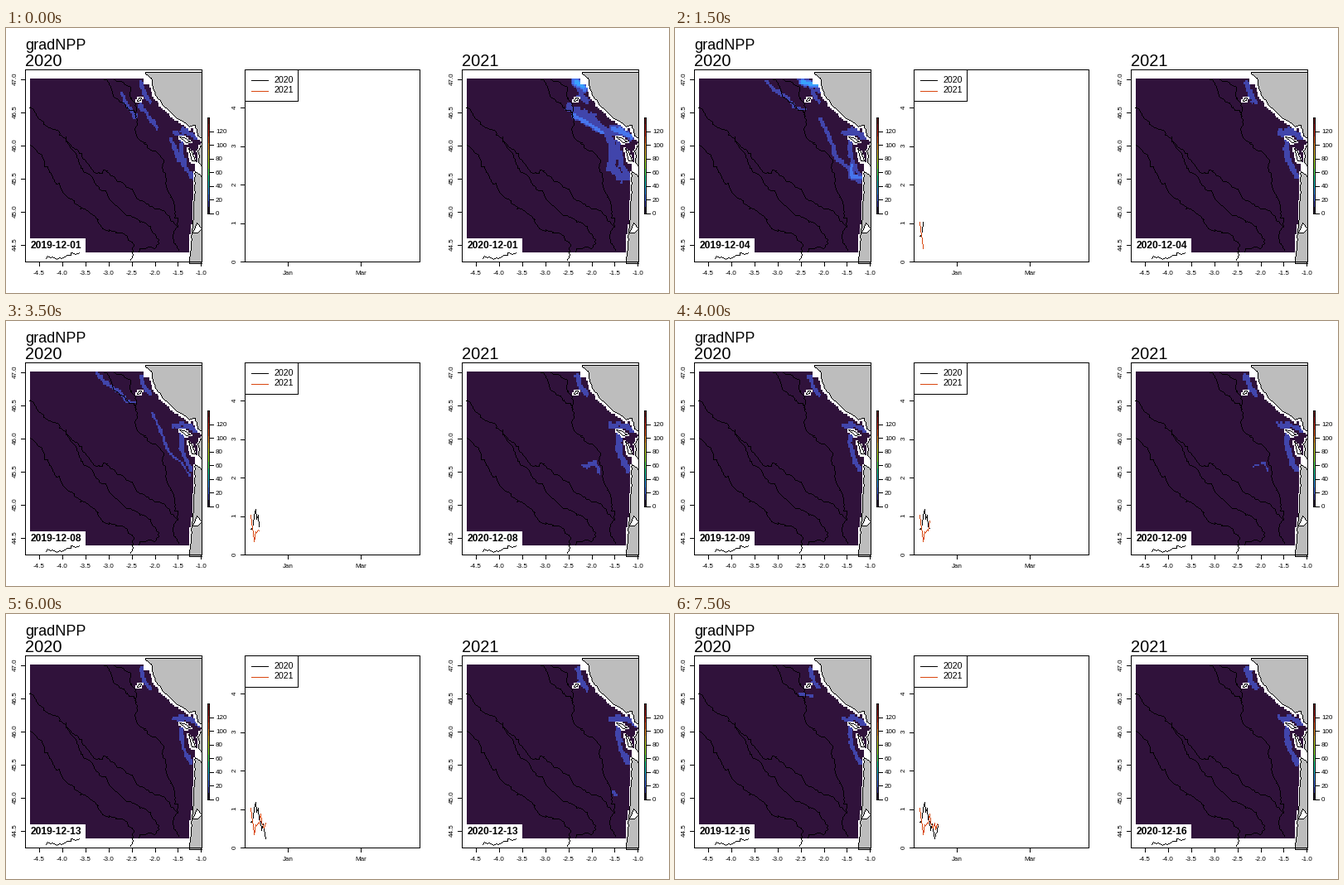
Animation of 800 by 320 pixels, one loop 8 s. Source, as a matplotlib script:

```python
import numpy as np
import matplotlib.pyplot as plt
from matplotlib.animation import FuncAnimation
from matplotlib.path import Path

W, H, DPI = 800, 320, 100
DAYS, STEP = 16, 500
PX = 72 / DPI
SHIFT = 527  # distance between the two maps
BLACK, WHITE, GREY = (0, 0, 0, 1), (1, 1, 1, 1), (0.745, 0.745, 0.745, 1)
ORANGE = (0.85, 0.28, 0.06, 1)

plt.rcParams["font.family"] = "Liberation Sans"
fig = plt.figure(figsize=(W / DPI, H / DPI), dpi=DPI, facecolor="white")
ax = fig.add_axes([0, 0, 1, 1])
ax.set_axis_off()


def line(xs, ys, color=BLACK, z=6):
    ax.plot(xs, ys, color=color, lw=PX, aa=False, zorder=z,
            solid_capstyle="butt")


def text(x, y, s, size, **kw):
    kw = {"ha": "left", "va": "baseline", "zorder": 9, **kw}
    return ax.text(x, y - 1.5, s, fontsize=size * PX, **kw)


def box(x0, y0, x1, y1):
    ax.fill([x0, x1, x1, x0], [y0, y0, y1, y1], fc="none", ec=BLACK,
            lw=PX, aa=False, zorder=6, joinstyle="miter")


def picture(rgba, extent, z):
    return ax.imshow(rgba, extent=extent, interpolation="nearest",
                     aspect="auto", zorder=z)


def x_tick(x, label):
    line([x, x], [281, 286])
    text(x, 299, label, 8, ha="center")


def y_tick(x, y, label):
    line([x - 5, x], [y, y])
    text(x - 12, y + 1, label, 8, rotation=90, ha="center", va="center")


# Curves drawn as single pixels, without smoothing
def canvas():
    return np.zeros((H, W, 4))


def dense(pts, step=1.0):
    """Resample a polyline evenly, counting the longer axis of each leg."""
    p = np.array(pts, float)
    s = np.r_[0, np.cumsum(np.abs(np.diff(p, axis=0)).max(1))]
    t = np.linspace(0, s[-1], max(2, int(np.ceil(s[-1] / step)) + 1))
    return np.c_[np.interp(t, s, p[:, 0]), np.interp(t, s, p[:, 1])]


def rough(pts, seed, amp):
    """A winding version of a polyline, with its ends kept."""
    rng = np.random.default_rng(seed)
    p = dense(pts, 2.5)
    n = rng.normal(0, amp, p.shape)
    for i in range(1, len(n)):
        n[i] += 0.7 * n[i - 1]
    n[[0, -1]] = 0
    return p + n


def trace(ink, pts, color=BLACK):
    x, y = np.rint(dense(np.rint(pts))).astype(int).T
    ok = (x >= 0) & (x < W) & (y >= 0) & (y < H)
    ink[y[ok], x[ok]] = color


def inside(pts, x, y):
    pix = np.c_[x.ravel(), y.ravel()]
    return Path(pts).contains_points(pix).reshape(x.shape)


# Land, from a few points of the coast
north = rough([(168, 53), (168, 56), (175, 60), (177, 69), (180, 80),
               (189, 93), (205, 108), (221, 119), (228, 117), (232, 131),
               (236, 133)], 1, 0.5)
middle = rough([(236, 141), (231, 148), (233, 155), (231, 162), (236, 168)], 2, 0.4)
south = rough([(236, 180), (228, 173), (227, 200), (225, 240), (221, 280)], 3, 0.25)
islands = [[(209, 131), (215, 132), (222, 137), (217, 138), (209, 131)],
           [(220, 145), (224, 149), (228, 160), (224, 160), (220, 145)],
           [(158, 88), (160, 84), (163, 84), (162, 87), (158, 88)]]
lagoon = [(225, 247), (230, 235), (236, 242), (231, 247), (225, 247)]
land = [np.vstack([north, (240, 133), (240, 53), north[:1]]),
        np.vstack([middle, (240, 168), (240, 141), middle[:1]]),
        np.vstack([south, (221, 284), (240, 284), (240, 180), south[:1]])]

# Depth contours, from deep to shallow
contours = [
    [(29, 141), (44, 154), (57, 186), (83, 212), (111, 231), (117, 244),
     (143, 250), (155, 263), (150, 280)],
    [(72, 131), (92, 168), (107, 184), (124, 206), (142, 224), (176, 238),
     (184, 262), (160, 270)],
    [(29, 95), (46, 119), (71, 131), (93, 155), (107, 173), (124, 173),
     (150, 193), (160, 207), (192, 222), (207, 240), (199, 252), (208, 268)],
    [(118, 62), (131, 83), (153, 99), (160, 134), (184, 153), (193, 182),
     (199, 208), (207, 240)],
    [(130, 62), (150, 73), (154, 88), (157, 106)],
    [(48, 278), (62, 277), (90, 270)]]

ink = canvas()
px, py = np.meshgrid(np.arange(W), np.arange(H))
for p in land:
    ink[inside(p, px, py)] = GREY
for p in islands + [lagoon]:
    ink[inside(p, px, py)] = WHITE
for p in land + islands + [lagoon]:
    trace(ink, p)
for i, p in enumerate(contours):
    trace(ink, rough(p, 20 + i, 1.1))
ink[:, 237:] = 0
ink[:, SHIFT + 23:SHIFT + 237] = ink[:, 23:237]

# Data grid
X0, X1, Y0, Y1, NX, NY = 29, 237, 60, 270, 134, 94
gx, gy = np.meshgrid(X0 + (np.arange(NX) + 0.5) * (X1 - X0) / NX,
                     Y0 + (np.arange(NY) + 0.5) * (Y1 - Y0) / NY)


def distance(pts):
    p = dense(pts)
    return np.hypot(gx[..., None] - p[:, 0], gy[..., None] - p[:, 1]).min(-1)


dry = ((gx > 166) & (gy < 67)) | ((gx > 227) & (gy > 160))
for p in land:
    dry |= inside(p, gx, gy)
for p, gap in [(north, 3), (middle, 2), (south, 1.5)] + [(i, 2) for i in islands]:
    dry |= distance(p) < gap

grain = np.random.default_rng(7).normal(0, 1, gx.shape)
for axis in (0, 1):
    grain = np.roll(grain, 1, axis) + 1.5 * grain + np.roll(grain, -1, axis)
grain = np.clip(grain / grain.std(), -2, 2)

# Fronts swell and fade around one day; the coastal ones stay
fronts = []


def front(side, peak, half, day, span, *pts):
    fronts.append((side, peak, half, day, span, distance(pts)))


ALWAYS = 1e6
cape = [(163, 66), (167, 80), (174, 88)]
bay = [(203, 125), (213, 129), (211, 146), (215, 163), (223, 178)]
outer = [(152, 95), (178, 108), (198, 124), (204, 142), (204, 165), (213, 178), (226, 178)]
for side, half in ((0, 2.6), (1, 3.6)):
    front(side, 14, half, 1, ALWAYS, *cape)
    front(side, 14, half, 1, ALWAYS, *bay)
    front(side, 19, 2.5, 1, ALWAYS, (212, 123), (230, 131))

front(0, 15, 2.2, 1, 2.5, (140, 78), (145, 90), (156, 106))
front(0, 15, 2.2, 1, 2.5, (162, 92), (182, 119))
front(0, 15, 2.8, 1, 2.5, (199, 134), (208, 154), (226, 181))
front(0, 34, 3, 4, 2.5, (153, 64), (174, 69))
front(0, 17, 2.2, 6, 4, (110, 63), (120, 74), (137, 84), (145, 95), (157, 97))
front(0, 17, 2.4, 5.5, 4, (176, 110), (187, 132), (195, 156), (213, 172), (222, 186))
front(0, 24, 2.6, 4, 1.5, (213, 164), (212, 177), (226, 180))
front(0, 15, 1.7, 6, 1.7, (206, 193), (202, 220), (210, 240), (211, 268))
front(0, 15, 1.6, 11, 1.5, (140, 108), (168, 107))
front(0, 15, 1.8, 16, 1.5, (150, 95), (166, 98))

front(1, 15, 5, 1, 2, *outer)
front(1, 28, 2, 1, 1.5, (158, 104), (193, 125))
front(1, 35, 3.5, 1, 1.5, (161, 64), (169, 70))
front(1, 28, 3, 1, 1.5, (205, 120), (228, 131))
front(1, 15, 2, 6, 1.5, (195, 172), (186, 188))
front(1, 15, 2.4, 8, 1.7, (171, 174), (184, 170), (189, 181))
front(1, 15, 1.7, 13, 1.5, (205, 213), (208, 217))

COLORS = plt.get_cmap("turbo")(np.linspace(0, 1, 15))


def field(side, day):
    wave = np.roll(grain, 9 * day, axis=0)
    v = np.zeros(gx.shape)
    for owner, peak, half, best, span, d in fronts:
        if owner == side:
            now = peak * np.exp(-((day - best) / span) ** 2)
            v = np.maximum(v, now * np.exp(-0.4 * (d * (1 + 0.22 * wave) / half) ** 2))
    rgba = COLORS[(v // 10).astype(int)]
    rgba[dry] = 1, 1, 1, 0
    return rgba


def draw_map(side, year):
    o = side * SHIFT
    text(23 + o, 46, year, 20)
    img = picture(field(side, 1), (X0 + o, X1 + o, Y1, Y0), 1)
    box(23 + o, 49, 236 + o, 281)
    for i in range(8):
        x_tick(40 + 27.9 * i + o, f"{-4.5 + 0.5 * i:.1f}")
    for i in range(6):
        y_tick(23 + o, 61 + 40 * i, f"{47 - 0.5 * i:.1f}")
    ax.fill([28 + o, 96 + o, 96 + o, 28 + o], [253, 253, 270, 270],
            fc="white", lw=0, zorder=8)
    date = text(30 + o, 267, "", 12, weight="bold")

    # colour scale
    picture(COLORS[::-1, None], (243 + o, 246 + o, 223, 107), 5)
    box(243 + o, 107, 245 + o, 223)
    for v in range(0, 121, 20):
        y = 223 - v * 116 / 140
        line([245 + o, 250 + o], [y, y])
        text(253 + o, y + 4, str(v), 8)
    return img, date


def draw_chart():
    box(288, 49, 499, 281)
    for x, month in ((340, "Jan"), (428, "Mar")):
        x_tick(x, month)
    for v in range(5):
        y_tick(288, 281 - 46.5 * v, str(v))
    box(288, 49, 352, 87)
    for y, label, color in ((62, "2020", BLACK), (75, "2021", ORANGE)):
        line([296, 316], [y, y], color)
        text(324, y + 4, label, 10.6)


SERIES = [
    [.65, .65, .78, 1.0, 1.17, .90, 1.0, .72, .66, .44, .60, .45, .22, .33, .40, .57],
    [1.0, .80, .55, .32, .58, .55, .62, .60, .85, .64, .54, .50, .62, .45, .60, .55]]
day_x = 295 + 88 / 60 * np.arange(DAYS)


def curves(n):
    out = canvas()
    for values, color in zip(SERIES, (BLACK, ORANGE)):
        if n > 1:
            trace(out, np.c_[day_x[:n], 281 - 46.5 * np.array(values[:n])], color)
    return out


text(23, 27, "gradNPP", 18)
maps = [draw_map(0, "2020"), draw_map(1, "2021")]
draw_chart()
STAGE = (0, W, H - 1, -1)
picture(ink, STAGE, 4)
chart = picture(canvas(), STAGE, 7)
ax.set_xlim(0, W)
ax.set_ylim(H - 1, -1)


def update(i):
    for side, (img, date) in enumerate(maps):
        img.set_data(field(side, i + 1))
        date.set_text(f"{2019 + side}-12-{i + 1:02d}")
    chart.set_data(curves(i + 1))
    return [chart]


anim = FuncAnimation(fig, update, frames=DAYS, interval=STEP, repeat=True,
                     repeat_delay=0, blit=False)
plt.show()
```
